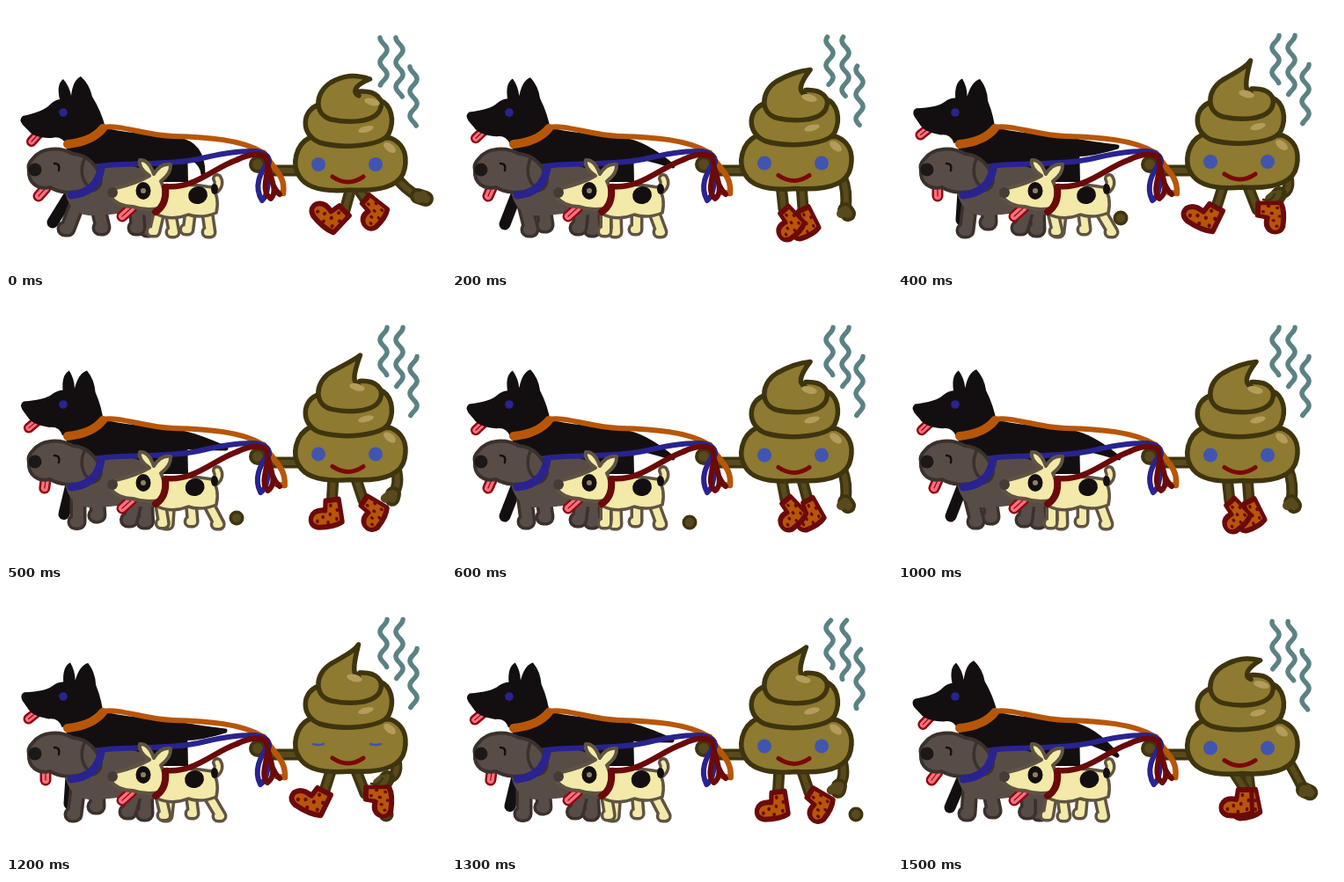
These frames come from a looping animation (500 px wide and 300 px high, 1600 ms). An HTML page with a canvas:

```html
<!DOCTYPE html>
<html lang="en">
<head>
<meta charset="utf-8">
<title>Dog walk</title>
<style>
html, body { margin: 0; width: 100%; height: 100%; overflow: hidden; background: #fff; }
canvas { display: block; width: 500px; height: 300px; }
</style>
</head>
<body>
<canvas id="stage" width="500" height="300"></canvas>
<script>
const ctx = document.getElementById('stage').getContext('2d');
ctx.lineCap = ctx.lineJoin = 'round';

const STEP = 100, FRAMES = 16;
const BLACK = '#130f11', BLUE = '#29238f', ORANGE = '#b85608', RED = '#6b0a0a';
const OLIVE = '#3e350f', BODY = '#8e7a30', LIMB = '#584a1d', SHINE = '#b49c5c';
const GREY = '#584d46', GREY_LINE = '#3b312c', CREAM = '#f3e9a8', CREAM_LINE = '#5f5343';

const shape = (d, fill, stroke, width) => {
  const path = new Path2D(d);
  if (fill) { ctx.fillStyle = fill; ctx.fill(path); }
  if (stroke) { ctx.strokeStyle = stroke; ctx.lineWidth = width; ctx.stroke(path); }
};
const line = (d, color, width) => shape(d, null, color, width);
const dot = (x, y, rx, fill, ry = rx, angle = 0) => {
  ctx.beginPath();
  ctx.ellipse(x, y, rx, ry, angle, 0, 7);
  ctx.fillStyle = fill;
  ctx.fill();
};
const limb = (d, fill, edge, width) => {
  line(d, edge, width);
  line(d, fill, width - 7);
};

// Walk poses are given at these steps of the eight-step cycle.
const KEYS = [0, 2, 4, 6, 7, 8];
function pose(step, keys) {
  const i = KEYS.findLastIndex(k => k <= step);
  const mix = (step - KEYS[i]) / (KEYS[i + 1] - KEYS[i]);
  const next = keys[(i + 1) % keys.length];
  return keys[i].map((v, n) => v + (next[n] - v) * mix);
}

function tongue(x, y, tipX, tipY, width) {
  const d = `M${x} ${y}L${tipX} ${tipY}`;
  line(d, '#8c0a14', width);
  line(d, '#f8707c', width - 5);
  line(d, '#8c0a14', 1.2);
}

function steam(rise) {
  for (const [x, y, length] of [[429, 36, 54], [447, 36, 67], [463, 69, 67]]) {
    ctx.beginPath();
    for (let i = 0; i <= length; i++)
      ctx.lineTo(x + 4 * Math.cos(i * 0.225 + Math.PI * (1 - rise)), y - 2.5 * rise + i);
    ctx.strokeStyle = '#5b8283';
    ctx.lineWidth = 5.5;
    ctx.stroke();
  }
}

function pellet(frame) {
  if (frame < 4 || frame > 14) return;
  const [x, y] = frame === 4 ? [253, 241] : frame === 5 ? [262, 250] : [270 + 27 * (frame - 6), 255];
  dot(x, y, 8.5, OLIVE);
  dot(x, y, 5, LIMB);
}

function boot([x, y, degrees, length]) {
  ctx.save();
  ctx.translate(x, y);
  ctx.rotate(degrees * Math.PI / 180);
  ctx.scale(length, 1);
  shape('M-9 1L9 1L10 27Q-2 32-23 30Q-34 27-31 18Q-26 9-11 12Z', ORANGE, RED, 6);
  for (const [sx, sy] of [[-3, 7], [5, 13], [-5, 17], [3, 23], [-15, 19], [-23, 23], [-9, 26]])
    dot(sx, sy, 2.2, RED);
  ctx.restore();
}

function walker(step, s, blink) {
  const [hx, hy] = pose(step, [[468, 216], [447, 232], [433, 214], [447, 232], [461, 227]]);
  const elbow = [450 + 3 * s, 210 - 2 * s];
  limb(`M443 194Q${elbow} ${hx} ${hy}`, LIMB, OLIVE, 13);
  const hand = `M${hx} ${hy}l${6 * s + 3} ${4 - s}`;
  line(hand, OLIVE, 18);
  line(`${hand}m-3-4l-5 4`, LIMB, 10);
  if (s < -0.8) line('M415 220q9 3 13-6m-3 10q11 0 12-12', OLIVE, 2.5);

  const far = pose(step, [[408, 219, -50, .75], [399, 230, -25, .75], [408, 231, -88, .8], [404, 229, -28, .75], [400, 227, -10, .75]]);
  const near = pose(step, [[385, 232, 45, .9], [377, 231, -42, .75], [362, 228, 28, .95], [379, 229, -42, .75], [394, 226, 0, .85]]);
  const hip = pose(step, [[393], [374], [370], [374], [379]])[0];
  limb(`M397 203L${far[0]} ${far[1]}`, LIMB, OLIVE, 13);
  boot(far);
  limb(`M${hip} 203L${near[0]} ${near[1]}`, LIMB, OLIVE, 13);
  boot(near);
  limb('M336 187H300', LIMB, OLIVE, 13);

  ctx.save();
  ctx.translate(0, 1.5 * (s - 1));
  shape('M346 149C328 158 325 181 333 193C342 209 368 211 391 209C425 211 449 205 453 185C457 166 449 155 437 150Z', BODY, OLIVE, 5.5);
  shape('M356 112C336 118 334 146 356 155C384 163 427 159 435 145C442 130 438 112 425 107Z', BODY, OLIVE, 5.5);
  const tip = `${407 + 6.5 * s} ${74 + 9 * s}`;
  const crest = `395 ${75 + 2 * s} ${tip}`;
  shape(`M370 129C350 124 353 97 369 87C383 79 ${crest}C395 91 395 99 401 101Q404 97 409 96C423 97 429 109 425 118C418 133 388 133 370 129Z`, BODY);
  line(`M401 102C394 99 394 91 ${tip}C395 ${75 + 2 * s} 383 79 369 87C350 99 350 124 370 129C388 133 418 133 425 118C430 106 421 96 402 97`, OLIVE, 5.5);
  dot(406 + 10 * s, 106 + 3 * s, 9, SHINE, 4, 0.25);
  dot(409, 140, 9, SHINE, 3.5, -0.25);
  dot(436, 161, 8, SHINE, 4.5, 0.65);
  for (const x of [355, 420]) {
    if (blink) line(`M${x - 6} 178q6 2 12 0`, '#3f55a8', 2.5);
    else dot(x, 180, 8, '#4055b0');
  }
  line('M371 194Q389 206 406 194', '#7b0808', 5);
  ctx.restore();
  dot(286, 180, 10, OLIVE);
  dot(286, 180, 6, LIMB);
}

function blackDog(step, s) {
  const [tx, ty] = pose(step, [[224, 191], [251, 182], [249, 160], [251, 182], [249, 188]]);
  const foot = pose(step, [[53, 246], [60, 248], [72, 243], [60, 248], [59, 247]]);
  shape(`M195 152Q${220 + 4 * s} 156 ${tx} ${ty}Q${218 + 4 * s} 171 192 168Z`, BLACK, BLACK, 5);
  shape('M68 150L106 136C140 148 178 143 206 155L207 200H150L72 218Z', BLACK);
  line(`M74 212L${foot}`, BLACK, 13);

  const nod = (1 - s) / 2;
  ctx.save();
  ctx.translate(90 - 2 * nod, 140 + 3 * nod);
  ctx.rotate(nod * 0.17);
  ctx.translate(-90, -140);
  tongue(37, 145, 29, 154, 12);
  shape('M19 125Q43 120 50 112Q55 107 61 106Q57 89 65 83Q72 91 74 102Q76 84 85 80Q95 89 98 103Q108 119 113 138L68 157Q63 147 52 150Q32 150 26 142L19 135Q14 129 19 125Z', BLACK);
  ctx.restore();
  dot(65, 121, 4.8, BLUE);
}

function greyDog(step, s) {
  const foot = pose(step, [[70, 253], [90, 254], [78, 255], [86, 254], [80, 254]]);
  const leg = (x, y, footX, footY) =>
    limb(`M${x} ${y}L${footX} ${footY}l-3 0`, GREY, GREY_LINE, 19);
  leg(158, 225, 161 + 2 * s, 254);
  leg(103, 222, 107 + 3 * s, 249 + 3 * s);
  leg(148, 225, 145 + 5 * s, 252);
  leg(82, 222, ...foot);
  shape('M100 180C130 176 155 182 170 195L180 232Q165 242 140 234Q118 238 94 238Q70 236 66 205Z', GREY);
  tongue(45, 207, 41 - 4 * s, 216, 13);
  shape('M30 174C40 160 62 160 76 168C93 169 104 182 108 196C108 209 97 212 88 209C77 214 60 212 50 206C36 209 25 201 26 187Q24 180 30 174Z', GREY, GREY_LINE, 4);
  line('M89 174C82 190 89 206 100 207', GREY_LINE, 3.5);
  dot(33, 186, 7.5, '#1c1817');
  line('M55 179q7 0 5 8', BLACK, 2.5);
}

function whiteDog(s) {
  const leg = (x, y, footX, footY) => limb(`M${x} ${y}L${footX} ${footY}l-3 0`, CREAM, CREAM_LINE, 15);
  leg(186, 230, 187 + 4 * s, 257);
  leg(210, 230, 210 - 3 * s, 254);
  leg(175, 230, 175 - 6 * s, 256);
  leg(228, 230, 238 - 6 * s, 257);
  limb('M233 211Q245 205 240 196', CREAM, CREAM_LINE, 12);
  shape('M174 207Q205 200 234 206Q243 217 239 235Q222 242 207 237Q188 245 170 236Z', CREAM, CREAM_LINE, 3.5);
  shape('M174 210Q205 204 232 209L236 234Q205 236 172 233Z', CREAM);
  dot(216 + 2 * s, 215, 11, BLACK, 10, -0.3);
  dot(237, 208, 4, BLACK, 6);

  tongue(143, 229, 132, 239, 13);
  shape('M163 193Q150 184 152 175Q162 174 168 191Q176 178 187 180Q188 190 176 199Q184 215 174 230Q158 233 144 228Q127 228 119 217Q116 209 125 207Q147 202 163 193Z', CREAM, CREAM_LINE, 4);
  dot(121, 212, 6, '#453c38');
  dot(156, 210, 8.5, BLACK, 10);
  dot(156, 210, 3, '#8d8064');
}

function draw(frame) {
  const step = frame % 8;
  const s = Math.cos(step * Math.PI / 4);
  ctx.clearRect(0, 0, 500, 300);
  pellet(frame);
  steam(Math.min(1, 1 - Math.cos(frame * Math.PI / 8)));
  walker(step, s, frame === 12);

  blackDog(step, s);
  line('M70 157Q98 154 110 139', ORANGE, 10);
  line('M110 138C128 134 158 147 190 148C230 149 268 152 291 166', ORANGE, 6);
  line(`M293 167C304 186 318 192 ${316 - s} 213L308 212`, ORANGE, 6.5);

  greyDog(step, s);
  line('M74 215Q104 212 108 184', BLUE, 9);
  line('M106 182C142 177 180 182 218 174Q258 164 284 165Q300 168 299 178', BLUE, 6);
  line(`M297 178C289 190 281 205 ${290 + s} 221C299 214 298 196 298 180`, BLUE, 6);

  whiteDog(s);
  line('M170 234Q183 226 181 206', RED, 8);
  line('M182 205C214 208 236 184 262 175Q282 165 295 171', RED, 6.5);
  line(`M295 171C303 186 286 208 ${299 + 2 * s} 219C310 210 299 192 297 178Q301 205 311 214`, RED, 6);
}

function tick() {
  draw(Math.floor(performance.now() / STEP) % FRAMES);
  requestAnimationFrame(tick);
}
tick();
</script>
</body>
</html>
```
